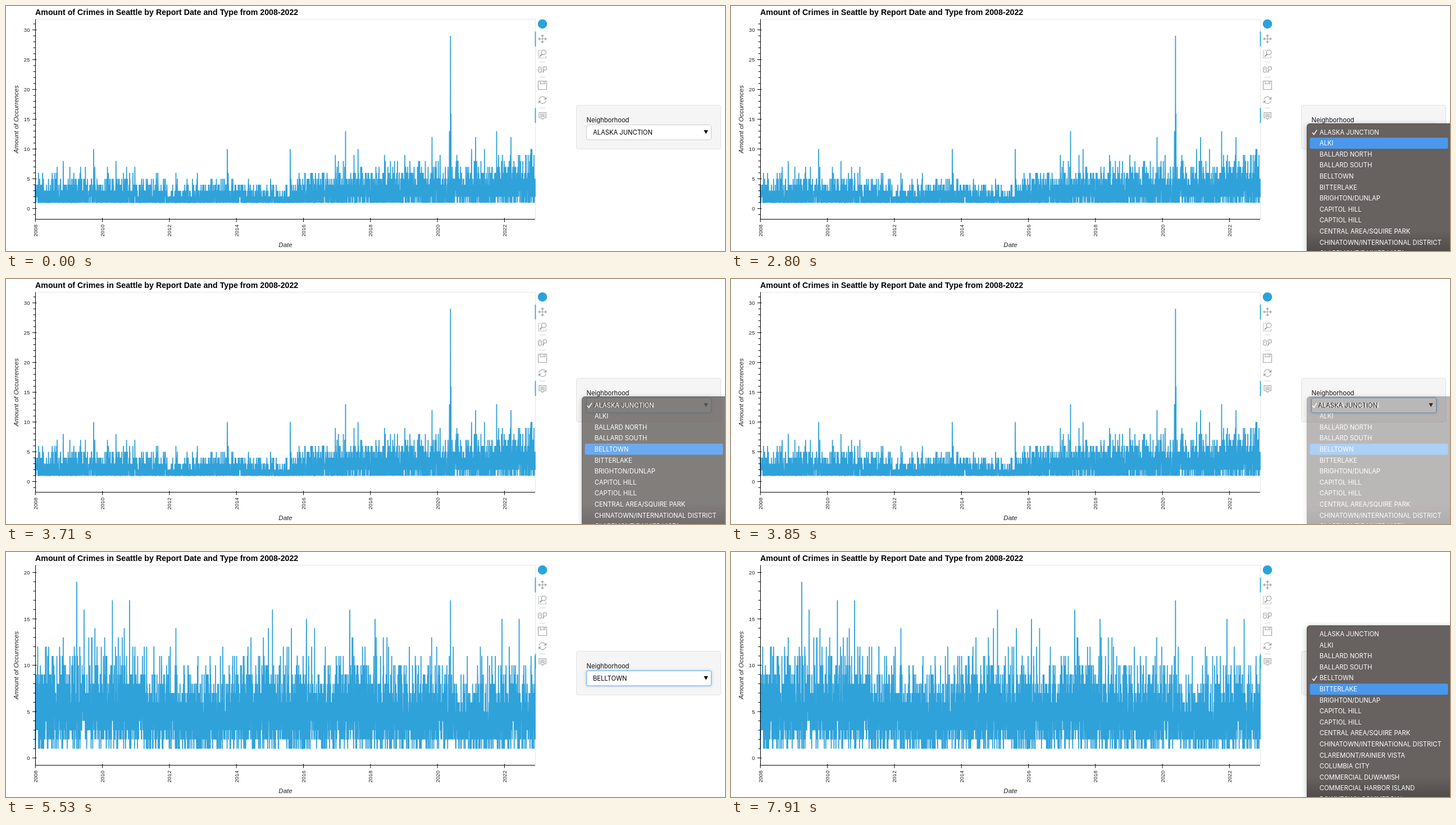
Write an HTML page that moves like this. It is 1280 by 436 pixels and loops after 8 s.

```html
<!DOCTYPE html>
<html lang="en">
<head>
<meta charset="utf-8">
<title>Crime chart</title>
<style>
  html, body { margin: 0; width: 100%; height: 100%; overflow: hidden; background: #fff; }
  svg { display: block; width: 1280px; height: 436px; }
  text { font-family: "Liberation Sans", Arial, sans-serif; white-space: pre; }
  .ui text { font: 11.2px Inter, sans-serif; }
  .small { font-size: 9.6px; text-anchor: end; fill: #222; }
  .name { font-size: 11.5px; font-style: italic; text-anchor: middle; fill: #222; }
  .icon { fill: none; stroke: #a1a6a9; stroke-width: 1.2; }
  .icon .solid { fill: #a1a6a9; stroke: none; }
  #menu { filter: drop-shadow(0 2px 5px rgba(0, 0, 0, .28)); }
</style>
</head>
<body>
<svg viewBox="0 0 1280 436">
  <defs>
    <linearGradient id="fade" x1="0" y1="0" x2="0" y2="1">
      <stop offset="0" stop-color="#3c3836" stop-opacity="0"/>
      <stop offset="1" stop-color="#3c3836" stop-opacity=".5"/>
    </linearGradient>
    <filter id="blur" x="-10%" y="-50%" width="120%" height="200%">
      <feGaussianBlur stdDeviation="2.2"/>
    </filter>
  </defs>

  <path d="M52 23.5H942.5V379" fill="none" stroke="#e5e5e5"/>
  <g id="plots"></g>
  <path d="M52.5 23.5V379.5H942" fill="none" stroke="#000"/>
  <g id="years"></g>
  <text x="52" y="16" font-size="14.23" font-weight="bold">Amount of Crimes in Seattle by Report Date and Type from 2008-2022</text>
  <text class="name" x="497.5" y="429">Date</text>
  <text class="name" transform="translate(21.5 201.5) rotate(-90)">Amount of Occurrences</text>

  <path d="M942.5 45.5V72M942.5 181.5V208" stroke="#26aae1" stroke-width="1.8"/>
  <circle cx="955" cy="32" r="8.3" fill="#2aa3dc"/>
  <path d="M950 99.5h10M950 126.5h10M950 181.5h10" stroke="#d4d4d4"/>
  <g class="icon">
    <path d="M949 58.5h12M955 52.5v12"/>
    <path class="solid" d="M947 58.5l3.5-3v6zM963 58.5l-3.5-3v6zM955 50.5l-3 3.5h6zM955 66.5l-3-3.5h6z"/>
    <path d="M952 79H948V92.5H961.5V88" stroke-dasharray="2 1.2"/>
    <circle cx="957.5" cy="82.5" r="4.2"/>
    <path d="M954.5 85.8L950 90" stroke-width="2.2"/>
    <rect x="947.7" y="108.5" width="5.6" height="9.5" rx="2.8"/>
    <path d="M950.5 111v2.5"/>
    <circle cx="959.3" cy="111" r="3.2"/>
    <path d="M957.7 113.8L955.5 118.5" stroke-width="1.9"/>
    <path d="M947.5 133.5h15v15h-15zM951 133.5v5h8.500v-5M957 134.500v2.500"/>
    <path d="M949 166.5A6.3 6.3 0 0 1 960.3 164M961.3 168.5A6.3 6.3 0 0 1 950 171"/>
    <path class="solid" d="M962.3 161.5v5h-5zM948 173.5v-5h5z"/>
    <path d="M949 189.5h12.3V199h-3.600l-2.500 2.800l-2.500 -2.800H949zM951 192h8.300M951 194.300h8.300M951 196.600h8.300"/>
  </g>

  <g class="ui">
    <rect x="1015.5" y="176.5" width="257" height="78" rx="3" fill="#f5f5f5" stroke="#e3e3e3"/>
    <text x="1033.5" y="206.5" fill="#111">Neighborhood</text>
    <rect id="glow" x="1032.5" y="210.5" width="224" height="28.5" rx="4" fill="#66afe9" opacity=".6" filter="url(#blur)"/>
    <rect id="box" x="1033.5" y="211.5" width="222" height="26.5" rx="3" fill="#fff"/>
    <text id="value" x="1045" y="228.5"></text>
    <path d="M1242.3 221h7.6l-3.8 6.8z"/>
    <g id="menu">
      <rect id="sheet" x="1025.5" width="262" height="400" rx="5" fill="#67615f" stroke="#4b4644"/>
      <rect x="1026" y="400" width="254" height="36" fill="url(#fade)"/>
      <g id="list">
        <rect id="hover" x="1030.5" width="246" height="19.6" rx="3" fill="#4a98ec"/>
        <path id="tick" fill="none" stroke="#fff" stroke-width="1.5"/>
      </g>
    </g>
  </g>
</svg>
<script>
const LOOP = 8000, STEP = 70;
const LEFT = 52, WIDTH = 890, DAYS = 5440;
const ROW = 19.6, ROW_Y = 224.5;
const $ = id => document.getElementById(id);

function add(parent, tag, attrs, text = '') {
  const el = document.createElementNS('http://www.w3.org/2000/svg', tag);
  for (const k in attrs) el.setAttribute(k, attrs[k]);
  el.textContent = text;
  return parent.appendChild(el);
}

function show(el, on) {
  el.style.display = on ? '' : 'none';
}

function seeded(s) {
  return () => {
    s = (s + 0x6D2B79F5) | 0;
    let t = Math.imul(s ^ (s >>> 15), 1 | s);
    t = (t + Math.imul(t ^ (t >>> 7), 61 | t)) ^ t;
    return ((t ^ (t >>> 14)) >>> 0) / 4294967296;
  };
}

function poisson(mean, rnd) {
  const floor = Math.exp(-mean);
  let k = 0;
  for (let p = rnd(); p > floor; p *= rnd()) k++;
  return k;
}

// Linear interpolation through [x, y] points.
function interp(pts, x) {
  let i = 0;
  while (i < pts.length - 2 && pts[i + 1][0] < x) i++;
  const [[x0, y0], [x1, y1]] = pts.slice(i, i + 2);
  return y0 + (y1 - y0) * (x - x0) / (x1 - x0);
}

// mean: typical daily count along the axis; peaks: the tallest days.
const charts = [
  {
    seed: 11, zero: 360.5, unit: 10.6, low: -1, high: 31, limit: 10,
    mean: [[52, 1.9], [215, 1.9], [300, 1.3], [390, 1.9], [470, 1], [510, 1.3], [515, 2.3], [942, 3.6]],
    peaks: [[156, 10], [394, 10], [506, 10], [604.5, 13], [758.5, 12], [789.5, 13],
      [791.3, 29], [792.2, 16], [836, 12], [873.5, 13], [899, 12]]
  },
  {
    seed: 29, zero: 366.5, unit: 16.5, low: 0, high: 20, limit: 14,
    mean: [[52, 4.8], [190, 5.6], [340, 3.9], [430, 5.3], [560, 4.2], [635, 5.4], [835, 4], [942, 4.6]],
    peaks: [[126, 19], [139, 16], [189.5, 17], [220, 17], [474.5, 16], [535, 15],
      [612, 16], [657, 15], [791.3, 17], [883, 15], [913.5, 15]]
  }
];

function seriesPath({ seed, zero, unit, limit, mean, peaks }) {
  const rnd = seeded(seed);
  const tops = new Map(peaks.map(([x, n]) => [Math.round((x - LEFT) / WIDTH * DAYS), n]));
  const pts = [];
  for (let d = 0; d <= DAYS; d++) {
    const x = LEFT + d / DAYS * WIDTH;
    const m = interp(mean, x) * (.6 + .8 * rnd());
    const n = tops.get(d) || Math.min(poisson(m, rnd), limit);
    if (n) pts.push(x.toFixed(2) + ' ' + (zero - n * unit).toFixed(1));
  }
  return 'M' + pts.join('L');
}

for (const c of charts) {
  c.group = add($('plots'), 'g', {});
  add(c.group, 'path', {
    d: seriesPath(c), fill: 'none', stroke: '#30a2da', 'stroke-width': 1.8, 'stroke-linejoin': 'bevel'
  });
  for (let v = c.low; v <= c.high; v++) {
    const y = c.zero - v * c.unit, major = v % 5 === 0;
    add(c.group, 'path', { d: major ? `M47 ${y}H54.5` : `M48.5 ${y}H52`, stroke: '#000' });
    if (major) add(c.group, 'text', { class: 'small', x: 42.5, y: y + 3.5 }, v);
  }
}

for (let i = 0; i < 8; i++) {
  const x = 52.3 + i * 119.3;
  add($('years'), 'path', { d: `M${x} 377V384.5`, stroke: '#000' });
  add($('years'), 'text', { class: 'small', transform: `translate(${x + 3.5} 389) rotate(-90)` }, 2008 + 2 * i);
}

const areas = ['ALASKA JUNCTION', 'ALKI', 'BALLARD NORTH', 'BALLARD SOUTH', 'BELLTOWN', 'BITTERLAKE',
  'BRIGHTON/DUNLAP', 'CAPITOL HILL', 'CAPTIOL HILL', 'CENTRAL AREA/SQUIRE PARK',
  'CHINATOWN/INTERNATIONAL DISTRICT', 'CLAREMONT/RAINIER VISTA', 'COLUMBIA CITY',
  'COMMERCIAL DUWAMISH', 'COMMERCIAL HARBOR ISLAND', 'DOWNTOWN COMMERCIAL'];
areas.forEach((name, i) => add($('list'), 'text', { x: 1047.8, y: i * ROW + 4, fill: '#fff' }, name));

const OPEN = 1750, PICK = 3570, FADED = 4060, REDRAW = 4130, REOPEN = 7280;
const MOVES = [2800, 2870, 3010, 3080, 7910];   // the highlight goes down one row

function menuOpacity(t) {
  if (t < OPEN) return 0;
  if (t >= REOPEN) return 1;
  const held = Math.floor(t / STEP) * STEP;
  return Math.min(1, Math.max(0, 1 - (held - PICK - STEP) / 380));
}

function render(t) {
  const value = t < FADED ? 0 : 4;
  const hover = MOVES.filter(m => m <= t).length;
  const blink = t >= PICK && t < PICK + STEP;
  const focus = t >= OPEN;
  const opacity = t >= FADED && t < REOPEN ? 0 : menuOpacity(t);
  const top = ROW_Y - value * ROW;

  charts.forEach((c, i) => show(c.group, i === (t < REDRAW ? 0 : 1)));
  $('value').textContent = areas[value];
  show($('glow'), focus);
  $('box').setAttribute('stroke', focus ? '#66afe9' : '#ccc');
  show($('menu'), opacity > 0);
  $('menu').style.opacity = opacity;
  $('sheet').setAttribute('y', top - 15);
  $('list').setAttribute('transform', `translate(0 ${top})`);
  show($('hover'), !blink);
  $('hover').setAttribute('y', (hover - .5) * ROW);
  $('tick').setAttribute('d', `M1035 ${value * ROW + .8}l2.7 3.4l5.3 -8`);
}

const start = performance.now();
function frame() {
  render((performance.now() - start) % LOOP);
  requestAnimationFrame(frame);
}
frame();
</script>
</body>
</html>
```
